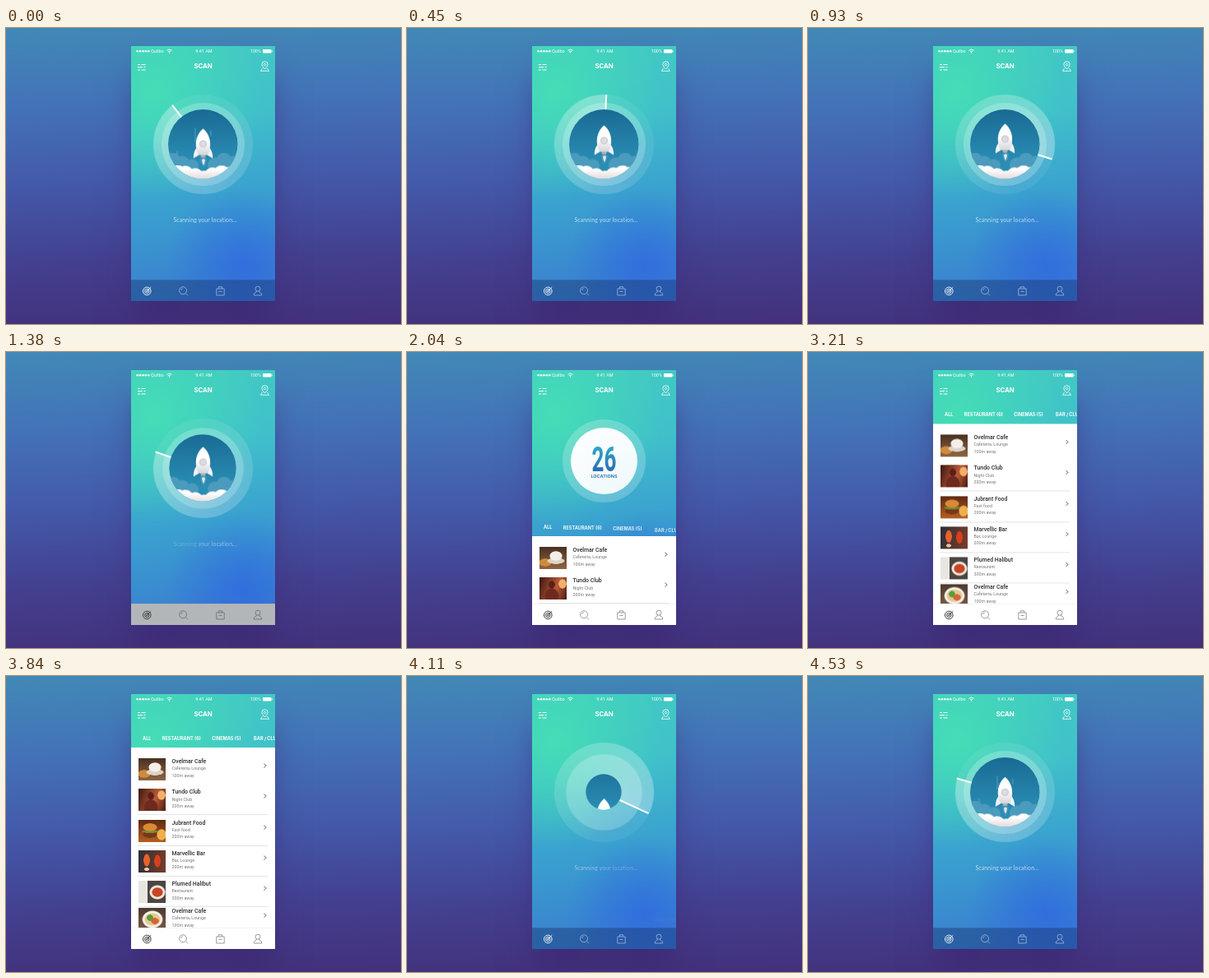
An HTML page for the animation above (4560 ms loop, 480x360 px).

```html
<!DOCTYPE html>
<html lang="en">
<head>
<meta charset="utf-8">
<title>Scan</title>
<style>
html, body { margin: 0; width: 100%; height: 100%; overflow: hidden; }
body {
  position: relative;
  background: linear-gradient(178deg, #4189b6 0, #4374b8 24%, #445aaa 50%, #434191 75%, #43307a 100%);
  font-family: Inter, sans-serif;
}
div, svg { position: absolute; }
.full { left: 0; top: 0; width: 480px; height: 360px; }
.phone {
  left: 152px; top: 22px; width: 175px; height: 310px;
  background:
    radial-gradient(circle at 16% 18%, #45e0b4e6 0, #45e0b400 130px),
    radial-gradient(circle at 78% 86%, #2f68e0cc 0, #2f68e000 95px),
    linear-gradient(172deg, #42cbc2 0, #40c0ca 30%, #3aa2cf 58%, #3a79d0 100%);
  box-shadow: 0 34px 34px -4px #3a246e88;
}
.view { clip-path: inset(22px 153px 54px 152px); }

.anim { animation: 4.56s linear infinite both; }
.disc {
  --r: 42.5px;
  left: calc(239px - var(--r)); top: calc(141px - var(--r));
  width: calc(2 * var(--r)); height: calc(2 * var(--r));
  border-radius: 50%;
}
.base { --r: 60.5px; background: #fff1; animation-name: halo; }
.sweep {
  --r: 60.5px;
  background: conic-gradient(#fff0 0, #fff0 60deg, #ffffff4a 360deg);
  animation-name: spin, halo;
}
.ring { --r: 50.5px; background: #ffffff38; animation-name: ring; }
.hand {
  left: 238.2px; top: 80.5px; width: 1.6px; height: 60.5px;
  background: #fff; transform-origin: 50% 100%; animation-name: spin, halo;
}
.scene { background: linear-gradient(#196a94, #2a8db3 75%); animation-name: iris; }
.scene svg { left: 0; top: 0; }
.rocket { animation-name: fly; }
.streaks { animation-name: fall; }
.count {
  --r: 40.5px;
  background: linear-gradient(150deg, #fff, #eef8fa); animation-name: count;
  text-align: center; color: #2f76b0; font-weight: 700;
}
.count b {
  position: absolute; left: 0; right: 0; top: 18px;
  font: 700 42px/42px Roboto, sans-serif; transform: scaleX(.62);
  background: linear-gradient(#2da5c8 15%, #2a6db2 85%);
  -webkit-background-clip: text; background-clip: text; color: transparent;
}
.count small { position: absolute; left: 0; right: 0; top: 55px; font-size: 5.4px; line-height: 8px; letter-spacing: .1px; }

.hint {
  left: 154.5px; width: 175px; top: 229px; text-align: center; white-space: pre;
  font: 400 6.8px/9px Lato, sans-serif; letter-spacing: .2px; color: #fff;
}
.hint span { animation-name: hint; animation-delay: var(--d); }

.panel { left: 152px; top: 87px; width: 175px; height: 260px; background: #fff; animation-name: panel; }
.tab {
  top: -15px; font-size: 5.6px; line-height: 8px; font-weight: 700; color: #fff;
  white-space: nowrap; animation-name: tab; animation-delay: var(--d);
}
.row { left: 8px; width: 158px; height: 45px; }
.pic { left: .5px; top: 13px; width: 33.5px; height: 27px; }
.info { left: 41.5px; top: 13px; font: 400 5.3px/8.3px Roboto, sans-serif; color: #777; white-space: nowrap; }
.info b { display: block; font-size: 6.9px; font-weight: 500; color: #2c2c2c; }
.row + .row::before { content: ""; position: absolute; left: 0; right: 0; bottom: 0; height: 1px; background: #e4e4e4; }
.row::after {
  content: ""; position: absolute; right: 2px; top: 20.2px; width: 2.6px; height: 2.6px;
  border: solid #888; border-width: .9px .9px 0 0; transform: rotate(45deg);
}
.bar { left: 152px; top: 306px; width: 175px; height: 26px; animation-name: bar; }
.bar svg { left: 0; top: 0; }

@keyframes spin {
  0% { transform: rotate(322deg); animation-timing-function: cubic-bezier(.333, .667, .667, 1); }
  7.72% { transform: rotate(360deg); animation-timing-function: cubic-bezier(.333, 0, .667, .333); }
  24.17% { transform: rotate(540deg); animation-timing-function: cubic-bezier(.333, .667, .667, 1); }
  40.61%, 77.02% { transform: rotate(720deg); animation-timing-function: cubic-bezier(.333, 0, .667, .333); }
  93.46% { transform: rotate(900deg); animation-timing-function: cubic-bezier(.333, .416, .667, .75); }
  100% { transform: rotate(1014.8deg); }
}
@keyframes halo {
  0%, 31.5% { opacity: 1; }
  36%, 85.5% { opacity: 0; }
  89.7%, 100% { opacity: 1; }
}
@keyframes ring {
  0%, 28.5% { transform: none; opacity: 1; }
  30.26% { transform: scale(.975); }
  35% { transform: scale(.88); animation-timing-function: ease-out; }
  42%, 53.73% { transform: translateY(-9px); opacity: 1; animation-timing-function: ease-in; }
  64.7% { transform: translateY(-52px) scale(.85); opacity: 0; }
  85.5% { transform: scale(.3); opacity: 0; }
  90.13% { transform: scale(.915); opacity: 1; animation-timing-function: ease-out; }
  94%, 100% { transform: none; opacity: 1; }
}
@keyframes iris {
  0%, 28.5% { clip-path: circle(42.5px); }
  30.26% { clip-path: circle(40.7px); animation-timing-function: ease-in; }
  35.5%, 87.3% { clip-path: circle(0px); }
  90.13% { clip-path: circle(21.5px); animation-timing-function: ease-out; }
  94.5%, 100% { clip-path: circle(42.5px); }
}
@keyframes fly {
  0% { transform: none; animation-timing-function: ease-out; }
  20.4% { transform: translateY(-6px); }
  30.26% { transform: translateY(-7px); }
  36% { transform: translateY(-9px); }
  36.1%, 87.3% { transform: translateY(54px); }
  90.13% { transform: translateY(27px); animation-timing-function: ease-out; }
  97% { transform: translateY(2px); }
  100% { transform: none; }
}
@keyframes fall {
  0% { transform: none; opacity: .6; }
  8%, 93% { transform: translateY(12px); opacity: 0; }
  93.1% { transform: translateY(-14px); opacity: 0; }
  98%, 100% { transform: none; opacity: .6; }
}
@keyframes count {
  0%, 34% { transform: translateY(-9px) scale(0); opacity: 1; animation-timing-function: ease-out; }
  42%, 53.73% { transform: translateY(-9px); opacity: 1; animation-timing-function: ease-in; }
  64.7% { transform: translateY(-52px) scale(.85); opacity: 0; }
  100% { transform: translateY(-9px) scale(0); opacity: 0; }
}
@keyframes hint {
  0%, 28.3% { opacity: .7; }
  31.3%, 87.5% { opacity: 0; }
  91.5%, 100% { opacity: .7; }
}
@keyframes panel {
  0%, 30.7% { transform: translateY(221px); animation-timing-function: cubic-bezier(.2, .6, .3, 1); }
  43.5%, 53.73% { transform: translateY(137px); animation-timing-function: cubic-bezier(.65, 0, .35, 1); }
  71.5%, 84.21% { transform: none; animation-timing-function: ease-in; }
  89.5%, 100% { transform: translateY(221px); }
}
@keyframes tab {
  0%, 35% { transform: translateY(16px); opacity: 0; animation-timing-function: ease-out; }
  46%, 84.21% { transform: none; opacity: 1; }
  87%, 100% { transform: none; opacity: 0; }
}
@keyframes bar {
  0%, 28.5% { background: #15316466; color: #fff; }
  30.26% { background: #b2b5b7; color: #333; }
  32.9%, 86.5% { background: #fff; color: #222; }
  89.7%, 100% { background: #15316466; color: #fff; }
}
</style>
</head>
<body>
<div class="phone"></div>

<div class="full view">
  <div class="disc base anim"></div>
  <div class="disc sweep anim"></div>
  <div class="disc ring anim"></div>
  <div class="hand anim"></div>
  <div class="disc scene anim">
    <svg width="85" height="85" viewBox="197 98.5 85 85">
      <defs>
        <linearGradient id="mist" x1="0" y1="166" x2="0" y2="183" gradientUnits="userSpaceOnUse">
          <stop offset=".3" stop-color="#fff"/><stop offset="1" stop-color="#e4dadd"/>
        </linearGradient>
        <linearGradient id="hull" x1="0" y1="0" x2="0" y2="1">
          <stop offset=".5" stop-color="#fff"/><stop offset="1" stop-color="#d5d6da"/>
        </linearGradient>
      </defs>
      <g class="streaks anim" stroke="#7fc0d8" stroke-width=".9">
        <path d="M230 121V138M249 124V131M208 149V166"/>
      </g>
      <g id="back" fill="#4a9bbd"></g>
      <g class="rocket anim">
        <path d="M235.8 159Q240 154 244.2 159Q243.5 165 240 169.5Q236.5 165 235.8 159Z" fill="#4b93b5"/>
        <path d="M238 160Q240 157 242 160Q241.6 164 240 166.5Q238.4 164 238 160Z" fill="#d6ecf4"/>
        <path d="M232 145Q227.6 149 227.8 158L234.5 154H244.5L251.2 158Q251.4 149 247 145Z" fill="#f3f3f5"/>
        <path d="M236 153H243L242 157H237Z" fill="#a9b1ba"/>
        <path d="M239.5 122C246 127 249.5 136 247.8 146Q247.2 150 245 154H234Q231.8 150 231.2 146C229.5 136 233 127 239.5 122Z" fill="url(#hull)"/>
        <circle cx="239.5" cy="140.5" r="4.6" fill="#c9ccd2"/>
        <circle cx="239.5" cy="140.5" r="3.2" fill="#dcdde1"/>
      </g>
      <g id="front" fill="url(#mist)"></g>
    </svg>
  </div>
  <div class="disc count anim"><b>26</b><small>LOCATIONS</small></div>
  <div class="hint"><span class="anim" style="--d:0s">Scanning</span><span class="anim" style="--d:.03s"> your</span><span class="anim" style="--d:.05s"> location...</span></div>
  <div class="panel anim" id="panel"></div>
</div>

<svg class="full" viewBox="0 0 480 360" fill="#fff">
  <g id="signal"></g>
  <g font-size="5.5" font-family="Roboto, sans-serif">
    <text x="176" y="30.2">Quilbo</text>
    <text x="240.5" y="30.2" text-anchor="middle">9:41 AM</text>
    <text x="310" y="30.2" text-anchor="end">100%</text>
  </g>
  <g fill="none" stroke="#fff">
    <path d="M195.500 27.300Q198.500 24.600 201.500 27.300M196.800 28.700Q198.500 27.200 200.200 28.700" stroke-width=".9"/>
    <path d="M160 44.500H163M164.500 44.500H169.500M160 47.700H166M167.500 47.700H169.500M160 51H163M164.500 51H169.500" stroke-width="1"/>
    <path d="M314.500 50Q310.800 46.500 310.800 44.400A3.700 3.700 0 0 1 318.200 44.400Q318.200 46.500 314.500 50ZM311.500 49L309.500 52.300H319.500L317.500 49" stroke-width=".8"/>
    <circle cx="314.5" cy="44.5" r="1.3" stroke-width=".7"/>
  </g>
  <circle cx="198.5" cy="30" r=".7"/>
  <rect x="312" y="26" width="10.5" height="4.6" rx=".8"/>
  <rect x="322.8" y="27.3" width=".8" height="2"/>
  <text x="239.6" y="49.2" text-anchor="middle" font-size="7.8" font-weight="700">SCAN</text>
</svg>

<div class="bar anim">
  <svg width="175" height="26" viewBox="152 306 175 26" fill="none" stroke="currentColor" stroke-width=".9">
    <path d="M152 306.2H327" stroke-width=".5" opacity=".15"/>
    <circle cx="171.3" cy="320" r="4.8"/>
    <circle cx="171.3" cy="320" r="2.6"/>
    <circle cx="171.3" cy="320" r=".6" fill="currentColor"/>
    <path d="M171.3 320L176.2 315.2"/>
    <g opacity=".5">
      <circle cx="215" cy="319.3" r="4.5"/>
      <path d="M218.300 322.600L221 325.300M212.500 319A2.500 2.500 0 0 1 214.700 316.800"/>
      <path d="M255.800 317H265.200V325H255.800ZM258.300 317V314.800H262.700V317M258.500 320.500H262.500"/>
      <circle cx="306" cy="317.2" r="3"/>
      <path d="M304.500 319.900Q304.500 321.300 302.600 322Q301.200 322.800 301.200 325H310.800Q310.800 322.800 309.400 322Q307.500 321.300 307.500 319.900"/>
    </g>
  </svg>
</div>

<script>
const $ = id => document.getElementById(id);
const dots = list => list.map(([x, y, r]) => `<circle cx="${x}" cy="${y}" r="${r}"/>`).join('');
const blob = (x, y, w, h, c) => `radial-gradient(ellipse ${w}px ${h}px at ${x}px ${y}px, ${c} 88%, transparent)`;

$('signal').innerHTML = dots([0, 1, 2, 3, 4].map(i => [159.6 + i * 3.4, 28.3, 1.3]));
$('back').innerHTML = dots([[203, 160, 9], [214, 164, 9], [226, 167, 8], [254, 166, 9], [265, 160, 9], [277, 165, 10]]);
$('front').innerHTML = dots([[209, 173, 7], [218, 177, 10], [230, 180, 10], [241, 184, 11], [251, 179, 10], [262, 176, 9.5], [270, 175, 6.5]]);

const pics = [
  [blob(20, 11, 8, 6, '#f4efe8'), blob(20, 17, 11, 4, '#ddd2c4'), blob(7, 19, 8, 5, '#d08a3c'), 'linear-gradient(#4a3020, #8f6544)'],
  [blob(15, 9, 4, 5, '#5a2118'), blob(15, 23, 9, 10, '#6e2a1e'), blob(28, 8, 5, 6, '#f3b06a'), 'linear-gradient(110deg, #3c1512, #b85a38 60%, #4a1814)'],
  [blob(14, 9, 9, 5, '#d98a34'), blob(14, 14, 10, 2, '#6d8f35'), blob(14, 18, 9, 4, '#7a3516'), blob(28, 18, 6, 7, '#eeb04a'), 'linear-gradient(#5e2a14, #b45f24)'],
  [blob(10, 12, 4, 8, '#e8622c'), blob(23, 13, 4, 8, '#d8401f'), blob(10, 23, 3, 2, '#e9c9a8'), 'linear-gradient(100deg, #2c2f38, #7a3d28)'],
  [blob(23, 14, 7, 6, '#c8452a'), blob(23, 14, 10, 9, '#f2e8dc'), 'linear-gradient(90deg, #e9e6e1 0 11px, #4c4643 11px)'],
  [blob(14, 12, 4, 4, '#5f9a3a'), blob(20, 16, 5, 4, '#d9633a'), blob(17, 14, 10, 8, '#e6c98f'), blob(17, 14, 13, 11, '#f4f1ec'), 'linear-gradient(#4b3a30, #7d5a45)']
];
const rows = [
  ['Ovelmar Cafe', 'Cafeteria, Lounge', 100],
  ['Tundo Club', 'Night Club', 200],
  ['Jubrant Food', 'Fast food', 200],
  ['Marvellic Bar', 'Bar, Lounge', 200],
  ['Plumed Halibut', 'Restaurant', 300],
  ['Ovelmar Cafe', 'Cafeteria, Lounge', 100]
];
const tabs = [['ALL', 14], ['RESTAURANT (6)', 37.8], ['CINEMAS (5)', 98.2], ['BAR / CLUB', 149]];

$('panel').innerHTML =
  tabs.map(([name, x], i) => `<div class="tab anim" style="left:${x}px;--d:${i * .05}s">${name}</div>`).join('') +
  rows.map(([name, kind, far], i) => `<div class="row" style="top:${Math.min(i * 37.3, 182)}px">
    <div class="pic" style="background:${pics[i].join(',')}"></div>
    <div class="info"><b>${name}</b>${kind}<br>${far}m away</div></div>`).join('');
</script>
</body>
</html>
```
